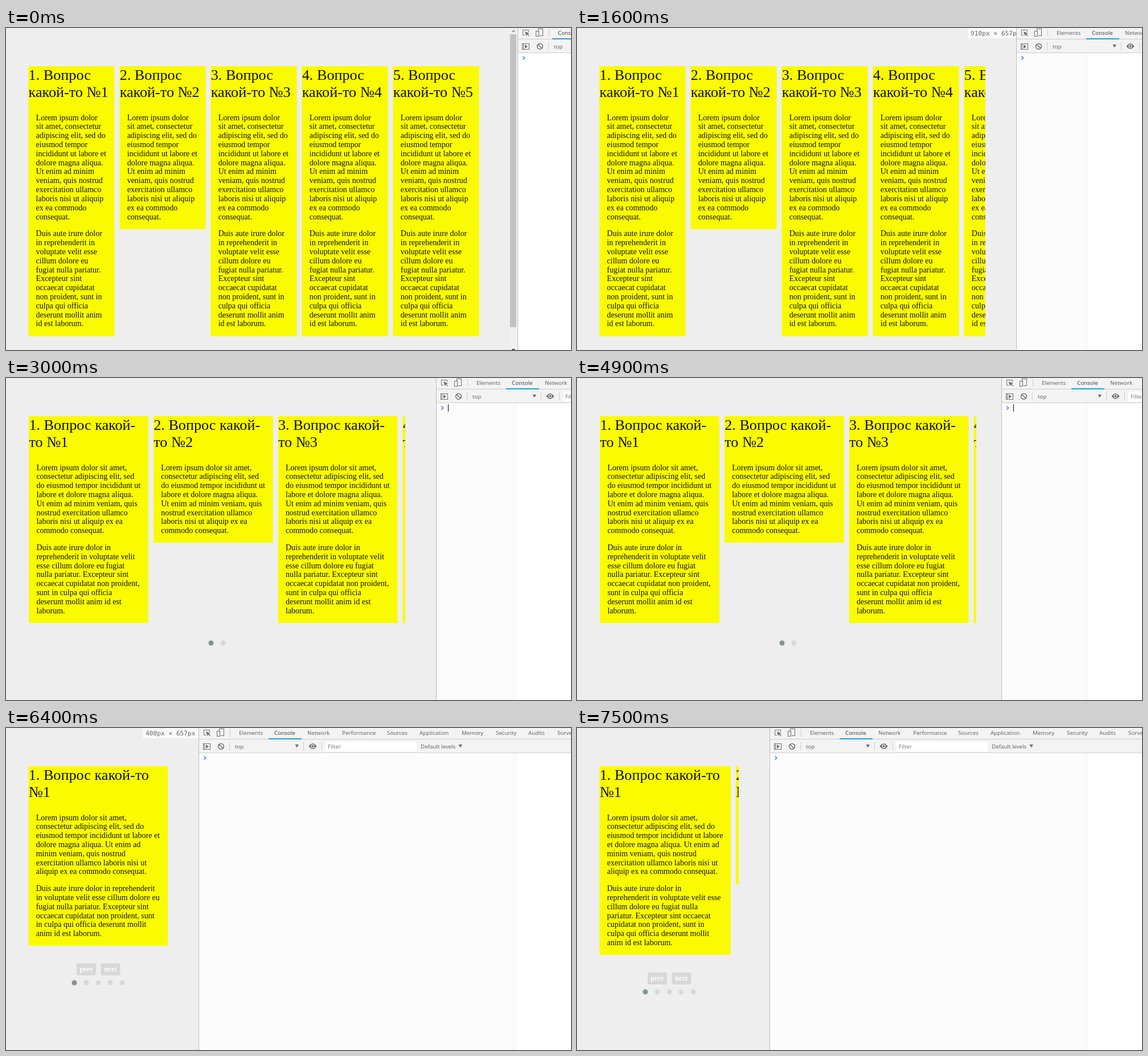
Write an HTML page with a canvas that moves like this. It is 992x565 px and loops after 8 s.

```html
<!DOCTYPE html>
<html lang="ru">
<head>
<meta charset="utf-8">
<title>Slider resize</title>
<style>
html, body { margin: 0; width: 100%; height: 100%; overflow: hidden; background: #eee; }
canvas { display: block; width: 992px; height: 565px; }
</style>
</head>
<body>
<canvas id="stage" width="992" height="565"></canvas>
<script>
const ctx = document.getElementById('stage').getContext('2d');
const W = 992, H = 565, LOOP = 8000;
const SERIF = '"Liberation Serif", "Times New Roman", serif';
const UI = '9.8px "Open Sans", "Noto Sans", sans-serif';
const MONO = '11.2px "DejaVu Sans Mono", monospace';
const YELLOW = '#fafa00', ICON = '#6e6e6e';

// Panel edge at each 100 ms step of the two drags
const DRAGS = [
  { at: 1100, xs: [897, 884, 856, 820, 784, 771, 762, 757, 755] },
  { at: 4900, xs: [745, 640, 499, 415, 355, 338] }
];
const BLINKS = [1100, 1600, 2000, 2500, 3000, 3500, 4000, 4400, 4900, 5400, 5900, 6400, 6900, 7400];
const TABS = [['Elements', 71], ['Console', 133], ['Network', 191], ['Performance', 252], ['Sources', 331],
  ['Application', 388], ['Memory', 462], ['Security', 522], ['Audits', 579], ['Sorvel', 630]];

const lines = s => s.split('|');
const LAYOUTS = {
  five: {
    x: 39.4, w: 151.2, pitch: 160.05, dots: 0, nav: false,
    head: n => [n + '. Вопрос', 'какой-то №' + n],
    p1: lines('Lorem ipsum dolor|sit amet, consectetur|adipiscing elit, sed do|eiusmod tempor|incididunt ut labore et|dolore magna aliqua.|Ut enim ad minim|veniam, quis nostrud|exercitation ullamco|laboris nisi ut aliquip|ex ea commodo|consequat.'),
    p2: lines('Duis aute irure dolor|in reprehenderit in|voluptate velit esse|cillum dolore eu|fugiat nulla pariatur.|Excepteur sint|occaecat cupidatat|non proident, sunt in|culpa qui officia|deserunt mollit anim|id est laborum.')
  },
  three: {
    x: 40.2, w: 209.8, pitch: 218.8, dots: 2, nav: false,
    head: n => [n + '. Вопрос какой-', 'то №' + n],
    p1: lines('Lorem ipsum dolor sit amet,|consectetur adipiscing elit, sed|do eiusmod tempor incididunt ut|labore et dolore magna aliqua.|Ut enim ad minim veniam, quis|nostrud exercitation ullamco|laboris nisi ut aliquip ex ea|commodo consequat.'),
    p2: lines('Duis aute irure dolor in|reprehenderit in voluptate velit|esse cillum dolore eu fugiat|nulla pariatur. Excepteur sint|occaecat cupidatat non proident,|sunt in culpa qui officia|deserunt mollit anim id est|laborum.')
  },
  one: {
    x: 39.5, w: 245.5, pitch: 254, dots: 5, nav: true,
    head: n => [n + '. Вопрос какой-то', '№' + n],
    p1: lines('Lorem ipsum dolor sit amet,|consectetur adipiscing elit, sed do|eiusmod tempor incididunt ut labore et|dolore magna aliqua. Ut enim ad|minim veniam, quis nostrud|exercitation ullamco laboris nisi ut|aliquip ex ea commodo consequat.'),
    p2: lines('Duis aute irure dolor in reprehenderit|in voluptate velit esse cillum dolore eu|fugiat nulla pariatur. Excepteur sint|occaecat cupidatat non proident, sunt|in culpa qui officia deserunt mollit|anim id est laborum.')
  }
};
LAYOUTS.narrow = Object.assign({}, LAYOUTS.one, {
  w: 230.5, pitch: 239.4,
  p1: lines('Lorem ipsum dolor sit amet,|consectetur adipiscing elit, sed do|eiusmod tempor incididunt ut labore|et dolore magna aliqua. Ut enim ad|minim veniam, quis nostrud|exercitation ullamco laboris nisi ut|aliquip ex ea commodo consequat.'),
  p2: lines('Duis aute irure dolor in|reprehenderit in voluptate velit esse|cillum dolore eu fugiat nulla|pariatur. Excepteur sint occaecat|cupidatat non proident, sunt in|culpa qui officia deserunt mollit|anim id est laborum.')
});

function rect(x, y, w, h, color) {
  ctx.fillStyle = color;
  ctx.fillRect(x, y, w, h);
}

function frame(x, y, w, h, color = ICON) {
  ctx.strokeStyle = color;
  ctx.lineWidth = 1;
  ctx.strokeRect(x + .5, y + .5, w - 1, h - 1);
}

function poly(points, color) {
  ctx.fillStyle = color;
  ctx.beginPath();
  points.forEach(([x, y]) => ctx.lineTo(x, y));
  ctx.fill();
}

function disc(x, y, r, color) {
  ctx.fillStyle = color;
  ctx.beginPath();
  ctx.arc(x, y, r, 0, 7);
  ctx.fill();
}

function text(s, x, y, font, color) {
  ctx.font = font;
  ctx.fillStyle = color;
  ctx.fillText(s, x, y);
}

function edgeAt(t) {
  let x = 898;
  for (const { at, xs } of DRAGS) {
    if (t >= at) x = xs[Math.min(xs.length - 1, Math.floor((t - at) / 100))];
  }
  return x;
}

function layoutAt(t) {
  if (t < 2000) return LAYOUTS.five;
  if (t < 5600) return LAYOUTS.three;
  return t < 7200 ? LAYOUTS.one : LAYOUTS.narrow;
}

function drawSlide(lay, n) {
  const x = lay.x + (n - 1) * lay.pitch, step = 15.82;
  const rows = [];
  let y = 161.5;
  for (const s of lay.p1) { rows.push([s, y]); y += step; }
  if (n !== 2) {
    y += 13.9;
    for (const s of lay.p2) { rows.push([s, y]); y += step; }
  }
  const bottom = Math.round(y - step + 17.2);
  rect(x, 67, lay.w, bottom - 67, YELLOW);
  lay.head(n).forEach((s, i) => text(s, x + .2, 91 + 30 * i, '26.2px ' + SERIF, '#111'));
  for (const [s, base] of rows) text(s, x + 13.2, base, '14px ' + SERIF, '#111');
  return bottom;
}

function drawButton(label, x, y) {
  ctx.fillStyle = '#d8d8d8';
  ctx.beginPath();
  ctx.roundRect(x, y, 34, 21, 2);
  ctx.fill();
  ctx.textAlign = 'center';
  text(label, x + 17, y + 14, 'bold 12.2px ' + SERIF, '#fff');
  ctx.textAlign = 'left';
}

function drawPage(lay, pageW) {
  const right = Math.min(831, pageW - 54);
  ctx.save();
  ctx.beginPath();
  ctx.rect(39, 0, right - 39, H);
  ctx.clip();
  const count = Math.min(5, Math.ceil((right - lay.x) / lay.pitch));
  let bottom = 0;
  for (let n = 1; n <= count; n++) bottom = Math.max(bottom, drawSlide(lay, n));
  ctx.restore();

  const mid = (40 + right) / 2;
  if (lay.nav) {
    drawButton('prev', mid - 38, bottom + 31);
    drawButton('next', mid + 4.5, bottom + 31);
  }
  for (let i = 0; i < lay.dots; i++) {
    disc(mid + (i - (lay.dots - 1) / 2) * 21, bottom + (lay.nav ? 65 : 35), 4.5, i ? '#d8d8d8' : '#80958f');
  }
}

function drawScrollbar(hover) {
  rect(885, 0, 13, H, '#f1f1f1');
  poly([[887.5, 7], [894.5, 7], [891, 3]], '#a3a3a3');
  rect(885, 11, 11, 514, hover ? '#a8a8a8' : '#c1c1c1');
  poly([[887.5, 563], [894.5, 563], [891, 567]], '#505050');
}

function drawSizeLabel(right, pageW) {
  const px = Math.floor(pageW * 1.1778 + 2);
  rect(right - 98, 0, 98, 18, '#fafafa');
  text(px + 'px × 657px', right - 93, 13, MONO, '#666');
}

function drawIcons(p) {
  // inspect arrow
  ctx.strokeStyle = ICON;
  ctx.lineWidth = 1;
  ctx.beginPath();
  ctx.moveTo(p + 13, 12.5);
  ctx.lineTo(p + 9.5, 12.5);
  ctx.lineTo(p + 9.5, 3.5);
  ctx.lineTo(p + 19.5, 3.5);
  ctx.lineTo(p + 19.5, 7);
  ctx.stroke();
  poly([[p + 13, 6], [p + 21, 9.5], [p + 18, 10.5], [p + 21, 13.5], [p + 20, 14.5], [p + 17, 11.5], [p + 15.5, 14]], ICON);
  // device toggle
  frame(p + 36, 1, 9, 13);
  rect(p + 32, 5, 7, 10, '#f3f3f3');
  frame(p + 32, 5, 6, 10);
  // sidebar toggle
  frame(p + 8, 27, 13, 11);
  rect(p + 10, 27, 1, 11, ICON);
  poly([[p + 13, 29], [p + 18, 32.5], [p + 13, 36]], ICON);
  // clear
  ctx.lineWidth = 1.5;
  ctx.beginPath();
  ctx.arc(p + 39.5, 32.3, 4.9, 0, 7);
  ctx.moveTo(p + 36, 29);
  ctx.lineTo(p + 43, 35.6);
  ctx.stroke();
  // eye
  ctx.fillStyle = ICON;
  ctx.beginPath();
  ctx.moveTo(p + 193.5, 32);
  ctx.quadraticCurveTo(p + 200.5, 22.5, p + 207.5, 32);
  ctx.quadraticCurveTo(p + 200.5, 41.5, p + 193.5, 32);
  ctx.fill();
  disc(p + 200.5, 32, 3.2, '#f3f3f3');
  disc(p + 200.5, 32, 2, ICON);
}

function drawTools(p, moved, caret) {
  rect(p, 0, W - p, H, '#fff');
  if (moved) {
    rect(p, 44, 889 - p, H - 44, '#fcfcfc');
    rect(889, 44, 8, H - 44, '#f9f9f9');
  }
  rect(p, 0, W - p, 43, '#f3f3f3');
  rect(p, 19, W - p, 1, '#ccc');
  rect(p, 43, W - p, 1, '#ccc');

  const tight = p > 870;
  for (const [name, dx] of TABS) {
    const active = name === 'Console';
    if (tight && !active) continue;
    const x = p + (tight ? 71 : dx);
    text(name, x, 12.3, UI, active ? '#333' : '#5a5a5a');
    if (active) rect(x - 10, 18, 58, 2, '#1aa3dc');
  }
  drawIcons(p);
  rect(p + 55, 2, 1, 13, '#ccc');
  for (const dx of [54, 184, 216]) rect(p + dx, 25, 1, 14, '#ccc');

  text('top', p + 64, 36, UI, '#5a5a5a');
  poly([[p + 169.5, 29], [p + 176, 29], [p + 172.8, 34.5]], ICON);
  rect(p + 223, 24, 160, 17, '#fff');
  text('Filter', p + 227, 36.3, UI, '#757575');
  text('Default levels', p + 390, 36, UI, '#5a5a5a');
  poly([[p + 456.5, 29], [p + 463, 29], [p + 459.8, 34.5]], ICON);

  ctx.strokeStyle = '#367cf1';
  ctx.lineWidth = 1.5;
  ctx.beginPath();
  ctx.moveTo(p + 9.5, 49.5);
  ctx.lineTo(p + 12.7, 52.5);
  ctx.lineTo(p + 9.5, 55.5);
  ctx.stroke();
  if (caret) rect(p + 21, 46, 1, 13, '#000');
  rect(p, 0, 1, H, '#bdbdbd');
}

function draw(t) {
  const edge = edgeAt(t), prev = edgeAt(t - 100);
  const pageW = t < 4900 ? edge : prev;
  rect(0, 0, W, H, '#eee');
  drawPage(layoutAt(t), pageW);
  if (t < 1200) drawScrollbar(t >= 500 && t < 600);
  if ((t >= 1200 && t < 2700) || (t >= 5000 && t < 6600)) drawSizeLabel(prev, pageW);
  drawTools(edge, t >= 1200, BLINKS.filter(b => t >= b).length % 2 === 1);
}

const start = performance.now();
function tick() {
  draw((performance.now() - start) % LOOP);
  requestAnimationFrame(tick);
}
tick();
</script>
</body>
</html>
```
